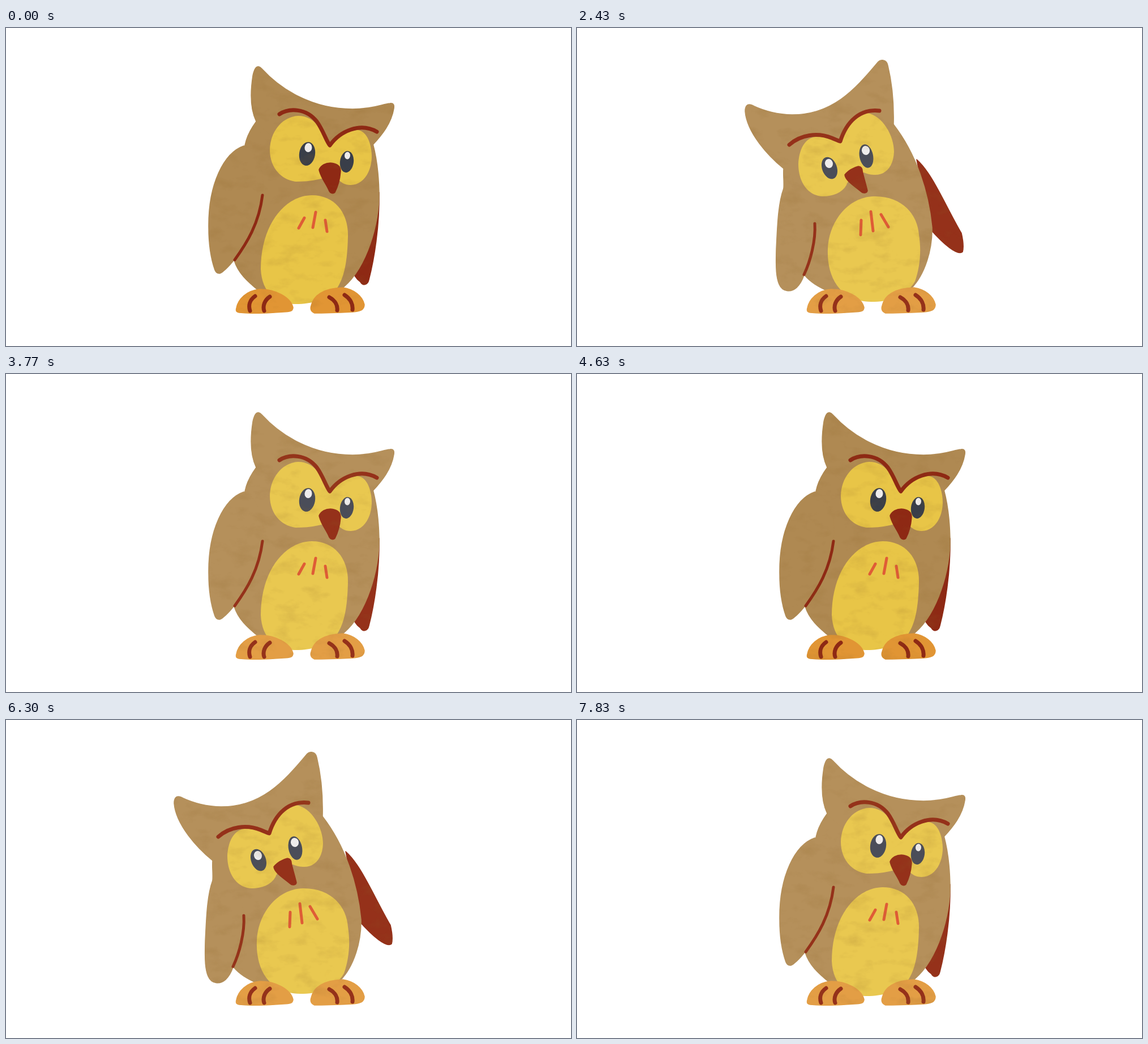
Animation, 998 px wide and 561 px high, one loop 7910 ms. Source, as an HTML page:

```html
<!DOCTYPE html>
<html lang="en">
<head>
<meta charset="utf-8">
<title>Owl</title>
<style>
  html, body { margin: 0; width: 100%; height: 100%; overflow: hidden; background: #fff; }
  svg { display: block; width: 100%; height: 100%; }
  .brown, .orange, .red { stroke-width: 1.5; stroke-linejoin: round; }
  .brown { fill: var(--brown); stroke: var(--brown); }
  .yellow { fill: var(--yellow); }
  .orange { fill: var(--orange); stroke: var(--orange); }
  .red { fill: var(--red); stroke: var(--red); }
  .pupil { fill: var(--pupil); }
  .glint { fill: #eeecec; }
  .line { fill: none; stroke: var(--red); stroke-width: 7; stroke-linecap: round; stroke-linejoin: round; }
  .thin { stroke-width: 5; }
  .mark { stroke: #df5c36; stroke-width: 5; }
</style>
</head>
<body>
<svg id="stage" viewBox="0 0 998 561" xmlns="http://www.w3.org/2000/svg">
  <filter id="paper" filterUnits="userSpaceOnUse" x="260" y="45" width="480" height="470" color-interpolation-filters="sRGB">
    <feTurbulence id="grain" type="fractalNoise" baseFrequency=".025 .045" numOctaves="4" seed="1"/>
    <feColorMatrix values="0 0 0 0 .56  0 0 0 0 .4  0 0 0 0 .16  .45 0 0 0 -.23"/>
    <feComposite in2="SourceAlpha" operator="in" result="mottle"/>
    <feMerge><feMergeNode in="SourceGraphic"/><feMergeNode in="mottle"/></feMerge>
  </filter>
  <g id="owl" filter="url(#paper)"></g>
</svg>
<script>
const LOOP = 7910;

// Every pose uses the same path commands, so poses can be blended.
const right = {
  backWing: 'M659 290C660 350 650 410 641 444C639 453 631 456 626 448C620 444 618 440 616 437Z',
  torso: 'M442 165C425 188 420 205 418 240C405 300 390 360 403 410C410 432 425 446 447 464C480 480 570 480 590 462C632 432 656 360 659 300C659 260 655 230 648 204C600 140 500 120 442 165Z',
  belly: 'M540 295C580 295 605 325 604 368C603 410 598 440 584 460C565 480 540 487 512 487C480 487 452 470 450 425C450 350 490 296 540 295Z',
  wing: 'M420 208C385 220 357 275 358 352C358 385 363 410 369 427C372 434 378 435 384 429C395 420 400 412 404 408C430 372 449 340 453 296C460 250 440 215 420 208Z',
  crease: 'M404 409C425 380 447 345 453 295',
  head: 'M436 84C439 70 444 63 452 72C485 108 540 143 612 143C650 143 665 134 678 133C685 132 686 136 685 142C681 168 664 189 648 206C600 250 500 230 442 165C430 140 432 110 436 84Z',
  face: 'M516 155C548 155 560 185 572 208C585 192 605 180 622 180C638 183 646 205 646 228C645 258 628 277 609 277C598 277 591 272 588 268C570 262 560 265 552 267C538 270 525 271 512 271C485 268 466 245 466 215C467 180 490 156 516 155Z',
  brows: 'M483 152C500 141 530 141 549 165C560 180 566 200 572 207C590 182 625 166 655 183',
  beak: 'M553 250C556 242 565 238 573 238C585 239 591 244 591 252C590 268 586 280 581 290C578 293 573 292 571 288C566 275 556 265 553 250Z',
  marks: 'M527 335L517 353M547 325L542 352M564 339L567 359',
  pupilL: '532 222 14 21 9', glintL: '534 211 6.5 8 5',
  pupilR: '602 236 12 19 8', glintR: '603 225 5 6.5 5'
};

const middle = {
  backWing: 'M632 261C672 281 705 330 725 369C726 377 722 378 715 376C685 367 655 356 630 341Z',
  torso: 'M412 186C397 210 388 240 384 262C383 300 384 330 386 352C386 402 405 438 447 464C480 480 560 480 578 462C622 430 640 362 636 290C635 245 625 210 604 178C550 140 460 140 412 186Z',
  belly: 'M536 287C580 286 607 325 607 375C606 415 595 440 578 460C565 475 540 481 515 481C470 481 447 435 447 395C449 335 490 288 536 287Z',
  wing: 'M384 262C357 278 329 304 307 332C294 349 282 364 275 378C270 390 275 398 286 396C318 382 350 364 386 350C402 345 418 338 434 336C430 300 410 262 384 262Z',
  crease: 'M387 350C402 345 418 338 433 336',
  head: 'M372 96C374 86 378 81 386 89C420 112 465 121 512 121C560 119 600 104 624 92C629 89 631 93 631 98C632 130 624 160 606 180C560 230 450 230 412 186C378 172 364 140 372 96Z',
  face: 'M479 160C505 160 517 178 527 192C538 175 550 163 567 162C590 165 603 190 603 218C602 255 585 277 567 277C556 277 549 273 545 268C540 262 532 262 521 270C514 276 505 279 491 279C460 278 441 250 441 218C440 190 455 162 479 160Z',
  brows: 'M440 160C466 149 495 156 509 170C517 179 524 186 527 191C538 162 570 146 603 159',
  beak: 'M517 247C521 240 528 238 534 238C541 238 546 240 549 245C550 252 545 268 541 281C539 285 533 285 531 281C527 270 520 255 517 247Z',
  marks: 'M522 338L513 358M541 325L542 356M559 340L564 353',
  pupilL: '494 228 12.5 21 -3', glintL: '495 217 6 8 5',
  pupilR: '562 230 11 19 5', glintR: '563 222 5.5 8.5 5'
};

const leaning = {
  backWing: 'M612 243C645 280 675 325 698 376C700 385 694 387 684 385C662 378 645 364 629 350Z',
  torso: 'M379 221C374 238 373 255 373 273C373 310 380 350 386 376C388 416 411 443 447 464C480 480 565 480 582 460C618 430 635 370 630 325C626 270 608 212 578 170C520 140 420 170 379 221Z',
  belly: 'M533 288C580 288 608 335 608 385C607 420 598 444 582 460C565 476 545 483 518 483C470 483 441 435 442 390C444 335 485 289 533 288Z',
  wing: 'M373 273C352 295 335 325 324 352C314 375 308 395 307 418C306 432 316 440 326 433C350 412 370 392 386 375C398 363 410 350 419 339C420 305 400 275 373 273Z',
  crease: 'M387 374C398 363 410 350 418 339',
  head: 'M318 121C316 112 321 112 327 115C352 130 385 133 412 132C490 131 545 110 590 72C596 67 599 73 600 82C605 115 595 150 578 172C530 240 430 260 379 221C345 204 322 172 318 121Z',
  face: 'M436 174C460 173 475 183 485 192C496 170 515 151 542 151C562 155 577 185 577 213C577 245 562 265 543 265C535 265 529 263 525 261C515 250 500 258 492 267C482 281 468 288 449 288C420 287 402 260 400 225C399 200 412 178 436 174Z',
  brows: 'M392 186C410 168 440 164 462 177C472 183 480 188 485 191C500 155 540 135 569 156',
  beak: 'M490 249C494 240 502 235 511 234C520 234 525 238 525 244C525 258 524 270 521 281C519 285 513 285 512 281C505 270 496 258 490 249Z',
  marks: 'M509 338L504 360M525 321L529 355M546 329L557 353',
  pupilL: '464 238 12 21 -10', glintL: '463 229 5.5 9 -8',
  pupilR: '531 223 10 20 -3', glintR: '531 213 5 8 -2'
};

const left = {
  backWing: 'M600 232C627 255 650 312 679 362C682 375 683 388 681 395C672 402 648 382 625 356Z',
  torso: 'M365 248C364 260 366 270 365 283C365 330 385 400 402 436C412 448 425 456 447 466C480 480 570 480 590 460C615 435 628 390 627 352C621 290 600 223 559 170C500 150 400 190 365 248Z',
  belly: 'M524 297C575 296 602 330 604 365C609 395 605 425 597 447C580 476 550 483 520 483C465 483 441 440 443 390C445 340 480 298 524 297Z',
  wing: 'M365 283C355 310 354 350 352 390C351 425 352 440 357 452C363 466 378 467 388 458C394 452 398 445 401 436C412 412 422 375 420 345C420 310 390 280 365 283Z',
  crease: 'M401 435C412 412 422 375 420 345',
  head: 'M297 147C297 135 303 132 313 138C330 146 355 153 380 153C450 153 490 110 530 62C536 54 547 55 549 66C556 95 560 130 559 170C520 250 400 290 365 248C338 226 300 185 297 147Z',
  face: 'M420 192C440 190 455 195 465 200C475 175 490 152 513 150C540 155 560 190 560 218C559 245 545 259 527 259C518 259 512 257 507 255C495 260 480 265 476 277C468 291 452 297 434 297C408 296 391 272 391 240C392 215 402 195 420 192Z',
  brows: 'M375 206C395 188 425 184 450 194C457 197 462 199 465 200C476 165 500 142 534 146',
  beak: 'M473 259C478 252 488 246 497 244C502 244 504 248 504 252C507 265 511 278 513 287C512 292 505 292 502 289C492 280 474 270 473 259Z',
  marks: 'M502 339L501 365M519 324L523 358M537 329L550 351',
  pupilL: '446 247 13 20 -20', glintL: '445 239 7 8 -15',
  pupilR: '511 226 12 21 -11', glintR: '510 216 7 8 -10'
};

const blend = (a, b, amount) => {
  const target = b.match(/-?[\d.]+/g);
  let i = 0;
  return a.replace(/-?[\d.]+/g, n => +(+n + (target[i++] - n) * amount).toFixed(2));
};

// The wings lag behind the body on the way to the right.
const turning = {};
for (const part in middle) {
  const amount = part === 'wing' || part === 'crease' ? .4 : .6;
  turning[part] = blend(middle[part], right[part], amount);
}

const schedule = [
  [0, right], [1330, turning], [1430, middle], [1570, leaning], [1670, left],
  [3200, leaning], [3300, middle], [3430, turning], [3530, right],
  [5300, turning], [5400, middle], [5500, leaning], [5630, left],
  [7170, leaning], [7270, middle], [7400, turning], [7500, right]
];

const owl = document.getElementById('owl');
const grain = document.getElementById('grain');
const stage = document.getElementById('stage');

function add(tag, className, d) {
  const node = document.createElementNS('http://www.w3.org/2000/svg', tag);
  node.setAttribute('class', className);
  if (d) node.setAttribute('d', d);
  return owl.appendChild(node);
}

const parts = {};
for (const [name, className] of [
  ['backWing', 'red'], ['torso', 'brown'], ['wing', 'brown'], ['crease', 'line thin'],
  ['belly', 'yellow'], ['marks', 'line mark'], ['head', 'brown'], ['face', 'yellow'],
  ['brows', 'line'], ['pupilL', 'pupil'], ['glintL', 'glint'],
  ['pupilR', 'pupil'], ['glintR', 'glint'], ['beak', 'red']
]) parts[name] = add(/pupil|glint/.test(name) ? 'ellipse' : 'path', className);

add('path', 'orange', 'M407 494C410 478 425 463 448 461C475 460 503 475 507 493C507 500 500 501 490 501C465 503 430 504 412 502C406 501 406 498 407 494Z');
add('path', 'orange', 'M539 490C543 472 560 459 595 458C615 461 630 473 633 488C633 498 625 500 612 501C590 502 565 503 545 503C538 500 537 496 539 490Z');
add('path', 'line', 'M440 473C430 480 428 490 431 499M466 474C457 480 453 490 456 499M571 475C582 481 586 490 585 498M598 471C609 478 613 488 612 497');

function setPose(pose) {
  for (const name in parts) {
    const node = parts[name];
    if (node.tagName === 'path') {
      node.setAttribute('d', pose[name]);
    } else {
      const [cx, cy, rx, ry, turn] = pose[name].split(' ');
      Object.entries({ cx, cy, rx, ry }).forEach(([key, value]) => node.setAttribute(key, value));
      node.setAttribute('transform', `rotate(${turn} ${cx} ${cy})`);
    }
  }
}

const names = ['brown', 'yellow', 'orange', 'red', 'pupil'];
const deep = ['#af8952', '#e8c547', '#e19534', '#8e2914', '#393e49'];
const pale = ['#b5905b', '#e9c850', '#e39e45', '#95311a', '#4a4d59'];

function setTexture(step) {
  const colors = [0, 1, 6].includes(step % 9) ? deep : pale;
  names.forEach((name, i) => stage.style.setProperty('--' + name, colors[i]));
  grain.setAttribute('seed', step + 1);
}

// Ten uneven texture steps repeat every 1100 ms.
const offsets = [0, 100, 200, 330, 430, 530, 630, 760, 860, 960];
function stepAt(t) {
  const shifted = t + 630;
  const within = offsets.filter(o => o <= shifted % 1100).length - 1;
  return Math.floor(shifted / 1100) * 10 + within - 6;
}

let shownPose, shownStep;
function draw() {
  const t = performance.now() % LOOP;
  const pose = schedule.filter(([start]) => start <= t).pop()[1];
  const step = stepAt(t);
  if (pose !== shownPose) setPose(shownPose = pose);
  if (step !== shownStep) setTexture(shownStep = step);
  requestAnimationFrame(draw);
}
draw();
</script>
</body>
</html>
```
